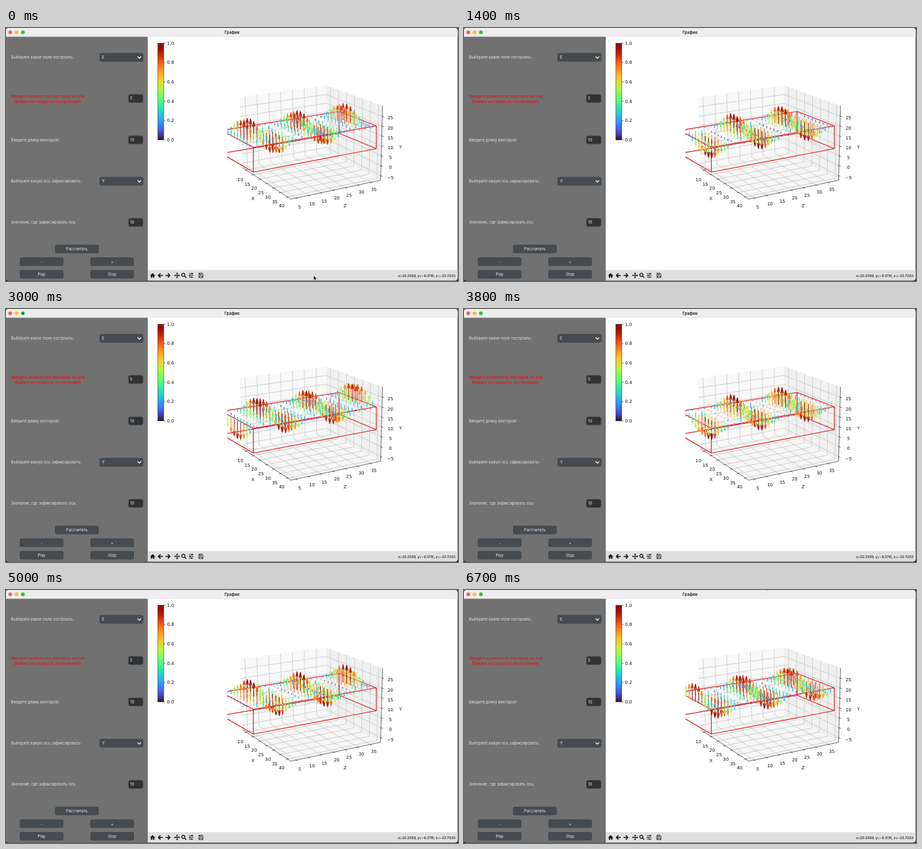
Recreate the animation shown at these times as an HTML page. Size 692 by 388 pixels, loop 6800 ms.

```html
<!DOCTYPE html>
<html lang="ru">
<head>
<meta charset="utf-8">
<style>
html, body { margin: 0; width: 100%; height: 100%; overflow: hidden; background: #222; }
svg { display: block; width: 692px; height: 388px; }
text { font-family: Inter, Roboto, sans-serif; font-size: 5.98px; }
.plot text { font-family: "DejaVu Sans", sans-serif; font-size: 6.8px; }
</style>
</head>
<body>
<svg id="stage" viewBox="0 0 692 388">
  <defs>
    <clipPath id="windowClip"><rect width="691.4" height="387.2" rx="4"/></clipPath>
    <clipPath id="axesClip"><rect x="339" y="14" width="300" height="356"/></clipPath>
    <linearGradient id="turbo" x1="0" y1="1" x2="0" y2="0"></linearGradient>
  </defs>
</svg>
<script>
const NS = "http://www.w3.org/2000/svg";
const stage = document.getElementById("stage");
const LOOP = 6800, STEP = 100;

function add(parent, tag, attrs = {}, content) {
  const node = document.createElementNS(NS, tag);
  for (const key in attrs) node.setAttribute(key, attrs[key]);
  if (content !== undefined) node.textContent = content;
  parent.appendChild(node);
  return node;
}
const group = (parent, attrs) => add(parent, "g", attrs);
const rect = (p, x, y, width, height, fill, rest) => add(p, "rect", { x, y, width, height, fill, ...rest });
const circle = (p, cx, cy, r, fill) => add(p, "circle", { cx, cy, r, fill });
const label = (p, x, y, str, fill, rest) => add(p, "text", { x, y, fill, ...rest }, str);
const line = (p, a, b, stroke, width = 0.7) =>
  add(p, "path", { d: `M${a}L${b}`, stroke, "stroke-width": width, fill: "none" });
const poly = (p, points, fill) => add(p, "polygon", { points: points.join(" "), fill });
const mid = { "text-anchor": "middle" };
const mix = (a, b, t) => [a[0] + (b[0] - a[0]) * t, a[1] + (b[1] - a[1]) * t];

// Polynomial approximation of the turbo colormap
const TURBO = [
  [0.1357, 4.6154, -42.6603, 132.1311, -152.9424, 59.2864],
  [0.0914, 2.1942, 4.8430, -14.1850, 4.2773, 2.8296],
  [0.1067, 12.6419, -60.5820, 110.3628, -89.9031, 27.3482]
];
function turbo(v) {
  const channels = TURBO.map(c => {
    const sum = c.reduceRight((acc, k) => acc * v + k, 0);
    return Math.round(255 * Math.min(1, Math.max(0, sum)));
  });
  return `rgb(${channels})`;
}

function drawColorbar(g) {
  const gradient = document.getElementById("turbo");
  for (let i = 0; i <= 20; i++)
    add(gradient, "stop", { offset: i / 20, "stop-color": turbo(i / 20) });
  rect(g, 232.3, 23.3, 9.2, 148.4, "url(#turbo)", { stroke: "#222", "stroke-width": 0.5 });
  for (let i = 0; i <= 5; i++) {
    const y = 171.7 - i * 29.68;
    line(g, [241.5, y], [244, y], "#222");
    label(g, 246.6, y + 2.4, (i / 5).toFixed(1), "#111");
  }
}

function drawAxes(g) {
  const left = [362, 214], front = [436, 262.5], right = [573.5, 233.5], back = [490.5, 189];
  const leftTop = [358, 106], backTop = [490, 88], rightTop = [576.5, 119.5];
  const grid = "#c0c0c0", ink = "#333";
  poly(g, [left, back, backTop, leftTop], "#f8f8f8");
  poly(g, [back, right, rightTop, backTop], "#f0f0f0");
  poly(g, [left, front, right, back], "#f6f6f6");

  for (let i = 0; i < 7; i++) {
    const tx = 0.08 + i * 0.142, tz = 0.06 + i * 0.1375, ty = 0.06 + i * 0.1335;
    const px = mix(left, front, tx), pz = mix(front, right, tz), py = mix(right, rightTop, ty);
    const farX = mix(back, right, tx), farZ = mix(left, back, tz);
    line(g, px, farX, grid);
    line(g, farX, mix(backTop, rightTop, tx), grid);
    line(g, pz, farZ, grid);
    line(g, farZ, mix(leftTop, backTop, tz), grid);
    const corner = mix(back, backTop, ty);
    line(g, py, corner, grid);
    line(g, corner, mix(left, leftTop, ty), grid);

    line(g, [px[0] + 1.5, px[1] - 0.4], [px[0] - 2.5, px[1] + 0.8], ink);
    line(g, [pz[0] - 1, pz[1] - 0.6], [pz[0] + 2, pz[1] + 1.4], ink);
    line(g, [py[0] - 1, py[1] - 0.5], [py[0] + 2.8, py[1] + 0.8], ink);
    label(g, px[0] - 9, px[1] + 17 - i * 0.15, 10 + 5 * i, "#111", mid);
    label(g, pz[0] + 5.3, pz[1] + 15.9 - i * 0.5, 5 + 5 * i, "#111", mid);
    label(g, 588.6, py[1] + 5, String(-5 + 5 * i).replace("-", "−"), "#111", mid);
  }
  for (const [a, b] of [[left, front], [front, right], [right, rightTop]]) line(g, a, b, ink);
  label(g, 378, 263.6, "X", "#111", mid);
  label(g, 519, 275.4, "Z", "#111", mid);
  label(g, 604, 185.4, "Y", "#111", mid);
}

// Waveguide: corners of the upper face
const guide = { backNear: [330, 157], backFar: [510, 128], frontNear: [378.6, 183], frontFar: [567, 150] };

function drawGuide(g) {
  const { backNear, backFar, frontNear, frontFar } = guide;
  const top = [backNear, backFar, frontFar, frontNear];
  const drop = [35.5, 33.5, 35, 38];
  const base = top.map((p, i) => [p[0], p[1] + drop[i]]);
  top.forEach((p, i) => {
    const next = (i + 1) % 4;
    line(g, p, top[next], "#e01a1e", 1.15);
    line(g, base[i], base[next], "#e01a1e", 1.15);
    line(g, p, base[i], "#e01a1e", 1.15);
  });
}

const arrows = [];
function createArrows(g) {
  const nz = 20, nx = 10;
  for (let i = 0; i <= nx; i++) {
    for (let j = nz; j >= 0; j--) {
      const u = i / nx, s = j / nz;
      const depth = s * 1.1 / (1 + 0.1 * s);
      const [x, y] = mix(mix(guide.backNear, guide.backFar, depth), mix(guide.frontNear, guide.frontFar, depth), u);
      const node = add(g, "path", { fill: "none", "stroke-width": 1.15 });
      arrows.push({ node, x, y: y + 1.8, s, size: Math.sin(Math.PI * u) * (1 - 0.08 * s) });
    }
  }
}

function updateArrows(t) {
  for (const { node, x, y, s, size } of arrows) {
    const value = size * Math.cos(2 * Math.PI * (2.5 * s - 0.2 - t * 0.000407));
    const amount = Math.abs(value), length = 31 * value;
    const tip = y - length, barb = tip + 0.3 * length, half = 2 * amount;
    const f = n => n.toFixed(2);
    node.setAttribute("d", amount < 0.04
      ? `M${f(x)} ${f(y - 0.4)}v0.8`
      : `M${f(x)} ${f(y)}V${f(tip)}M${f(x - half)} ${f(barb)}L${f(x)} ${f(tip)}L${f(x + half)} ${f(barb)}`);
    node.setAttribute("stroke", turbo(Math.min(1, amount * 1.03)));
  }
}

function drawPanel(g) {
  rect(g, 0, 13, 217, 375, "#717171");
  const pale = "#dcdfe2", fill = "#464b4f";
  const rows = [
    [45, "Выберите какое поле построить:", "E", true],
    [108, "", "5"],
    [171.5, "Введите длину векторов!", "10"],
    [235, "Выберите какую ось зафиксировать:", "Y", true],
    [298, "Значение, где зафиксировать ось:", "10"]
  ];
  for (const [y, caption, value, combo] of rows) {
    label(g, 7.5, y + 2.4, caption, pale);
    if (combo) {
      rect(g, 143, y - 6.7, 67.5, 13.4, fill, { rx: 3 });
      add(g, "path", { d: `M201.5 ${y - 1.2}l2.7 2.5l2.7-2.5`, fill: "none", stroke: "#eee", "stroke-width": 1.3 });
    } else {
      rect(g, 187.3, y - 6.3, 22.6, 12.8, "#303234", { rx: 2.8, stroke: "#50575b", "stroke-width": 0.8 });
    }
    label(g, combo ? 147 : 190, y + 2.3, value, "#f0f2f4");
  }
  const warning = { ...mid, "font-weight": 500, style: "font-size:6.1px" };
  label(g, 64, 107.2, "Введите количество векторов на оси", "#ec1010", warning);
  label(g, 63.5, 115, "(Влияет на скорость построения!)", "#ec1010", warning);

  const buttons = [[75, 332.3, "Рассчитать"], [21, 351.8, "-"], [129, 351.8, "+"], [21, 371, "Play"], [129, 371, "Stop"]];
  for (const [x, y, caption] of buttons) {
    rect(g, x, y, 67, 13.3, fill, { rx: 3 });
    label(g, x + 33.5, y + 8.9, caption, "#e6eaee", mid);
  }
}

function drawToolbar(g) {
  rect(g, 217, 371.3, 475, 16.7, "#dfdfdf");
  const ink = (d, width = 1.3, fill = "none") =>
    add(g, "path", { d, fill, stroke: "#111", "stroke-width": width });
  ink("M221 379.5l3.5-3.5l3.5 3.5h-1v3.3h-1.7v-2.3h-1.6v2.3H222v-3.3z", 0.4, "#111");
  ink("M240 379.4h-6.5m3-3.2l-3.2 3.2l3.2 3.2", 1.5);
  ink("M244.3 379.4h6.5m-3-3.2l3.2 3.2l-3.2 3.2", 1.5);
  ink("M258.3 379.4h7.4M262 375.7v7.4", 1);
  ink("M260.6 376.7l1.4-1.7l1.4 1.7zm0 5.4l1.4 1.7l1.4-1.7zM259.3 378l-1.7 1.4l1.7 1.4zm5.4 0l1.7 1.4l-1.7 1.4z", 0.2, "#111");
  ink("M273.9 378.5a2.4 2.4 0 1 1-4.8 0a2.4 2.4 0 1 1 4.8 0M273.4 380.4l2.6 2.6", 1.3);
  ink("M279.8 376.7h7.2M279.8 379.4h7.2M279.8 382.1h7.2", 0.8);
  ink("M284.8 375.5v2.4M281.8 378.2v2.4M284 380.9v2.4", 1.2);
  ink("M295.2 376h5.1l1.3 1.3v5.5h-6.4zM296.6 376v2.2h3v-2.2M296.6 382.6v-2.4h3.6v2.4", 0.8);
  label(g, 688, 381.5, "x=20.2569, y=−8.3115, z=−23.7203", "#111",
    { "text-anchor": "end", "font-weight": 500, style: "font-size:5.2px" });
}

function drawTitle(g) {
  rect(g, 0, 0, 692, 13.2, "#efedef");
  line(g, [0, 13.2], [692, 13.2], "#dcdadc", 0.5);
  ["#ff5c56", "#fdbb2d", "#28c53f"].forEach((color, i) => circle(g, 6.5 + i * 9.7, 6.6, 2.9, color));
  label(g, 346, 8.8, "График", "#333", { ...mid, "font-weight": 700, style: "font-size:6.2px" });
}

function tooltip(x, y, caption) {
  const g = group(view);
  rect(g, x, y, 42, 13.4, "#ececec", { rx: 2.5, stroke: "#c4c4c4", "stroke-width": 0.6 });
  label(g, x + 21, y + 9.2, caption, "#222", { ...mid, style: "font-size:6.8px" });
  return g;
}

const view = group(stage, { "clip-path": "url(#windowClip)" });
rect(view, 0, 0, 692, 388, "#fff");
drawPanel(group(view));
drawTitle(group(view));
drawToolbar(group(view));
const plot = group(view, { class: "plot" });
drawColorbar(plot);
drawAxes(plot);
const field = group(plot, { "clip-path": "url(#axesClip)" });
drawGuide(field);
createArrows(field);

const appTip = tooltip(461, 358.3, "Lurm 2D");
poly(appTip, [[479, 371.5], [485, 371.5], [482, 374.5]], "#ececec");
circle(appTip, 433, 394, 9, "#222630");
circle(appTip, 443, 387, 6, "#f0353b");
label(appTip, 443, 388.8, "2", "#fff", mid);
circle(appTip, 483, 393, 12.5, "#2b2a4c");
rect(appTip, 505, 384.5, 22, 8, "#43b94a", { rx: 3 });
const binTip = tooltip(634, 362, "Корзина");
const zoomGlyph = add(view, "path", { d: "M24.9 5.5h2.2l-2.2 2.2zM26.9 7.9v-2l-2 2z", fill: "#0b5a1a" });
const cursor = add(view, "path", {
  d: "M0 0V7.2L1.7 5.7L2.8 8.2L4 7.7L2.9 5.3H5.1Z", fill: "#111", stroke: "#fff", "stroke-width": 0.5
});

const show = (node, visible) => node.setAttribute("visibility", visible ? "visible" : "hidden");

function cursorAt(t) {
  if (t < 300) return [471, 379.5 + t * 0.03];
  if (t >= 6500) return [460.5, -7.2];
  return null;
}

function render(time) {
  const t = Math.floor((time % LOOP) / STEP) * STEP;
  updateArrows(t);
  show(appTip, t >= 500 && t < 1100);
  show(binTip, t >= 1800 && t < 2400);
  show(zoomGlyph, t >= 2900 && t < 3300);
  const spot = cursorAt(t);
  show(cursor, spot);
  if (spot) cursor.setAttribute("transform", `translate(${spot})`);
}

const start = performance.now();
function tick() {
  render(performance.now() - start);
  requestAnimationFrame(tick);
}
tick();
</script>
</body>
</html>
```
